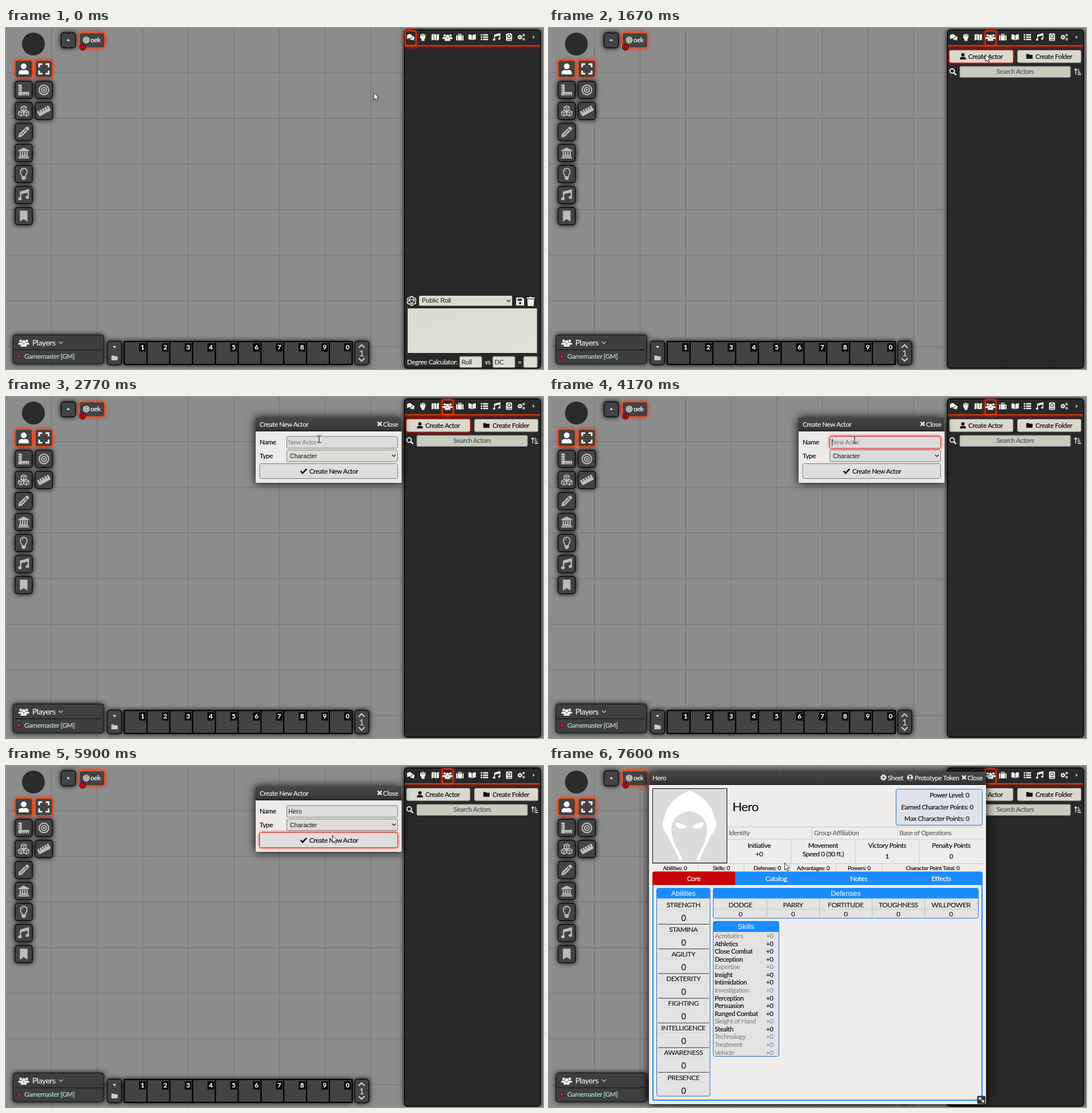
These frames come from a looping animation (940x596 px, 8 s). An HTML page:

```html
<!DOCTYPE html>
<html lang="en">
<head>
<meta charset="utf-8">
<title>Create an actor</title>
<style>
html, body { margin: 0; width: 100%; height: 100%; overflow: hidden; background: #8c8c8c; }
svg { display: block; width: 940px; height: 596px; }
text { font-family: Lato, "Open Sans", sans-serif; letter-spacing: -.03em; stroke: currentColor; stroke-width: .22px; fill: currentColor; white-space: pre; }
text.form { font-family: "Liberation Sans", Arial, sans-serif; letter-spacing: 0; stroke: none; }
.dark { filter: drop-shadow(0 0 4px #000); }
.deep { filter: drop-shadow(0 0 8px #000); }
.hot { filter: drop-shadow(0 0 3px #ff2800); }
.focus { filter: drop-shadow(0 0 2.5px #f00); }
</style>
</head>
<body>
<svg id="stage" viewBox="0 0 940 596" xmlns="http://www.w3.org/2000/svg"></svg>
<script>
const LOOP = 8000;
const BLUE = '#1a8cff';

// ---- drawing helpers ----
const rect = (x, y, w, h, fill, attr = '') =>
  `<rect x="${x}" y="${y}" width="${w}" height="${h}" fill="${fill}" ${attr}/>`;
const line = (x1, y1, x2, y2, color, w = 1) =>
  `<path d="M${x1} ${y1}L${x2} ${y2}" stroke="${color}" stroke-width="${w}"/>`;
const text = (x, y, s, color = '#111', size = 11.6, attr = '') =>
  `<text x="${x}" y="${y}" color="${color}" font-size="${size}" ${attr}>${s}</text>`;
const mid = (x, y, s, color, size, attr = '') =>
  text(x, y, s, color, size, 'text-anchor="middle" ' + attr);
const form = (x, y, s, color, attr = '') => text(x, y, s, color, 10.8, 'class="form" ' + attr);
const group = (id, body, attr = '') => `<g id="${id}" ${attr}>${body}</g>`;
const path = (d, attr = '') => `<path d="${d}" ${attr}/>`;
const dot = (x, y, r, attr = '') => `<circle cx="${x}" cy="${y}" r="${r}" ${attr}/>`;
const pen = (w = 2) => `fill="none" stroke="currentColor" stroke-width="${w}"`;
const repeat = (n, f) => Array.from({ length: n }, (_, i) => f(i)).join('');

// ---- icons, drawn in a box from -8 to 8 ----
const body = (x, y, s) => `<g transform="translate(${x} ${y}) scale(${s})">` +
  dot(0, -3.8, 4.2) + path('M-7.4 8V5.6C-7.4 2.6-5 1.6-2.6 1.4Q0 2.6 2.6 1.4C5 1.6 7.4 2.6 7.4 5.6V8Z') + '</g>';
const cog = (x, y, s) => `<g transform="translate(${x} ${y}) scale(${s})">` +
  dot(0, 0, 4.4, pen(3.6)) + dot(0, 0, 6.8, pen(2.6) + ' stroke-dasharray="2.9 2.44"') + '</g>';
const cube = (x, y) => path(`M${x} ${y - 4}l3.7 1.7v4.2l-3.7 2-3.7-2v-4.2zM${x - 3.6} ${y - 2.2}l3.6 1.7 3.6-1.7M${x} ${y - .5}v4.3`, pen(1.3));
const icons = {
  user: body(0, 0, 1),
  users: body(-5.4, -1, .55) + body(5.4, -1, .55) + body(0, 1.3, .72),
  expand: path('M-7-2.5V-7H-2.5M2.5-7H7V-2.5M7 2.5V7H2.5M-2.5 7H-7V2.5', pen(2.4)),
  corner: path('M-8-8H-3V3H8V8H-8ZM-8-4.5h2.5M-8-1h2.5M-8 2.5h2.5M-1.5 8V5.5M2 8V5.5M5.5 8V5.5') +
    path('M-8-4.8h2.6M-8-1.4h2.6M-8 2h2.6M-1.5 8V5.4M2 8V5.4M5.4 8V5.4', 'stroke="#444" stroke-width="1.1"'),
  target: dot(0, 0, 7, pen(1.8)) + dot(0, 0, 3.6, pen(1.8)) + dot(0, 0, 1.5),
  cubes: cube(0, -3.6) + cube(-4, 3.6) + cube(4, 3.6),
  ruler: '<g transform="rotate(-28)">' + rect(-9.5, -4, 19, 8, 'currentColor', 'rx="1"') +
    path('M-6-4v3.6M-2-4v3.6M2-4v3.6M6-4v3.6', 'stroke="#444" stroke-width="1.2"') + '</g>',
  pencil: path('M-8 8L-7 3 3-7Q5-8.6 7-6.8T7-3L-3 7Z') + path('M1.6-5.4L5.4-1.6M-4.5 4.5L3-3', 'stroke="#444" stroke-width="1"'),
  bank: path('M-8-4L0-8 8-4V-2.6H-8ZM-8 8V6H8V8ZM-6.6 5.4V3.6H6.6V5.4Z') + path('M-5-2V4M-1.7-2V4M1.7-2V4M5-2V4', pen(1.9)),
  bulb: path('M-2.4 4C-2.4 1.5-5-.4-5-3.4A5 5 0 0 1 5-3.4C5-.4 2.4 1.5 2.4 4Z', pen(1.6)) +
    path('M-2.8 5H2.8V7L1 8.5H-1L-2.8 7ZM-3-3.4Q-2.6-5.8 0-6', 'stroke="currentColor" stroke-width=".5"'),
  music: path('M-4.6 5V-4.4L6.8-7.4V3', pen(1.9)) + path('M-5-5L7.7-8.4V-4L-5-1Z') +
    '<ellipse cx="-5.6" cy="5.4" rx="2.6" ry="2.2"/><ellipse cx="5.4" cy="3.4" rx="2.6" ry="2.2"/>',
  mark: path('M-5.6-8H5.6V8L0 4.4-5.6 8Z'),
  chat: '<ellipse cx="-2.4" cy="-2" rx="5.8" ry="4.4"/>' + path('M-7 0L-8 4.4-2 2ZM4-2.6C9-2 9.6 3 6.8 4.4L8 7.4 3.8 5.8C.4 6.2-1.6 5-2 3.4 2 3.4 4.6 1 4-2.6Z'),
  fist: path('M-5-6h2v4h.8v-5.4h2V-2h.8v-5h2v5h.8v-4H5.4V1L3.4 4V8H-3V5L-6 1V-2Z'),
  map: path('M-8-5.4L-3.4-7V5.4L-8 7ZM-2.4-7L2.4-5.4V7L-2.4 5.4ZM3.4-5.4L8-7V5.4L3.4 7Z'),
  case: rect(-8, -4, 2.6, 11, 'currentColor') + rect(5.4, -4, 2.6, 11, 'currentColor') + rect(-4.4, -4, 8.8, 11, 'currentColor') + path('M-3-4V-6.4H3V-4', pen(1.6)),
  book: path('M-.6-4.4Q-4-6.4-8-6V5Q-4 5-.6 6.8ZM.6-4.4Q4-6.4 8-6V5Q4 5 .6 6.8Z'),
  list: path('M-8-5h3.4M-8 0h3.4M-8 5h3.4M-3-5H8M-3 0H8M-3 5H8', pen(3.2)),
  atlas: rect(-6.4, -8, 12.8, 16, 'currentColor', 'rx="2"') + dot(.4, -1.8, 3.4, 'fill="none" stroke="#333" stroke-width="1.4"') + path('M-4 5.4H5', 'stroke="#333" stroke-width="1.4"'),
  cogs: cog(-3, 0, .64) + cog(5, -4.4, .36) + cog(5, 4.4, .36),
  cog: cog(0, 0, 1),
  right: path('M-3-6L4 0-3 6Z'),
  up: path('M-6 3L0-4 6 3Z'),
  down: path('M-6-3L0 4 6-3Z'),
  chevUp: path('M-7 4L0-3 7 4', pen(3)),
  chevDown: path('M-7-4L0 3 7-4', pen(3)),
  folder: path('M-8-6H-2L0-4H8V6H-8Z'),
  die: path('M0-8L7-4V4L0 8-7 4V-4ZM0-8L-4-2H4ZM-4-2L0 5 4-2M-7-4L-4-2-7 4 0 5 7 4 4-2 7-4M0 5V8', pen(1)),
  save: path('M-7-7H4L7-4V7H-7Z') + rect(-4.6, -5, 7.6, 4, '#333') + dot(0, 3, 2.2, 'fill="#333"'),
  trash: path('M-7-7H-2.4L-1.6-8H1.6L2.4-7H7V-5H-7ZM-6-4H6L5.2 8H-5.2Z'),
  lens: dot(-1.6, -1.6, 4.8, pen(2.4)) + path('M2 2L7 7', pen(3)),
  sort: path('M-4.6 7V-6M-7.6-3L-4.6-6.4-1.6-3M0-5H3M0-1H4.6M0 3H6.2M0 7H8', pen(1.8)),
  check: path('M-7 0L-2.4 4.8 7-5', pen(3.4)),
  cross: path('M-5-5L5 5M5-5L-5 5', pen(3.6)),
  face: path('M-8 0a8 8 0 1 0 16 0a8 8 0 1 0-16 0ZM-3.2-2.4a3.2 3.2 0 1 1 6.4 0a3.2 3.2 0 1 1-6.4 0ZM-5 5Q-3.4 2.4 0 2.4T5 5Q0 9-5 5Z', 'fill-rule="evenodd"')
};
const icon = (name, x, y, size, color = '#eee') =>
  `<g transform="translate(${x} ${y}) scale(${size / 16})" color="${color}" fill="currentColor">${icons[name]}</g>`;

// ---- scene parts ----
function grid() {
  return rect(0, 0, 940, 596, '#8c8c8c') +
    repeat(12, i => line(-.2 + i * 79.8, 0, -.2 + i * 79.8, 596, '#747474')) +
    repeat(7, i => line(0, 78 + i * 79.8, 940, 78 + i * 79.8, '#747474'));
}
const tile = (x, y, w, h, hot) =>
  rect(x, y, w, h, '#434343', `rx="4" stroke="${hot ? '#ff5010' : '#0c0c0c'}" stroke-width="1.4" class="${hot ? 'hot' : 'dark'}"`);
function tools() {
  const left = ['user', 'corner', 'cubes', 'pencil', 'bank', 'bulb', 'music', 'mark'];
  const right = ['expand', 'target', 'ruler'];
  const column = (names, x) => names.map((n, i) => {
    const y = 56.5 + i * 36.75;
    return tile(x, y, 30, 30, !i) + icon(n, x + 15, y + 15, 19, i ? '#bcbcbc' : '#fff');
  }).join('');
  return dot(48, 28, 20, 'fill="#2b2b2b"') +
    tile(96.5, 8.5, 25, 26) + icon('up', 109, 21, 8) +
    tile(128.5, 8.5, 44, 26, true) + icon('target', 140.5, 21, 11.5, '#fff') + text(148, 25, 'oek', '#fff') +
    dot(134, 33.5, 5.5, 'fill="#d01222" stroke="#400"') + mid(134, 36.8, 'G', '#300', 9) +
    column(left, 16) + column(right, 51.3);
}
function players() {
  return rect(12.5, 536.5, 158.5, 50.5, '#3e3e3e', 'rx="4" stroke="#111" class="dark"') +
    icon('users', 31, 550, 16) + text(46, 554.5, 'Players', '#eee', 13.8) + icon('chevDown', 96, 550, 8, '#bbb') +
    line(16, 562.5, 168, 562.5, '#111') + dot(22.5, 574, 3.2, 'fill="#c8283c" stroke="#300"') +
    text(32, 578, 'Gamemaster [GM]', '#bcdccd');
}
function hotbar() {
  const slot = i => rect(207 + i * 39.9, 548, 39.9, 40, '#434343', 'stroke="#000" stroke-width="2"') +
    rect(233 + i * 39.9, 551, 11.5, 14.5, '#080808') +
    mid(238.8 + i * 39.9, 562.3, (i + 1) % 10, '#fff', 11.5, 'font-weight="700"');
  return tile(177.5, 547.5, 25, 41) + icon('down', 190, 557.5, 8) + icon('folder', 190, 576.5, 11, '#ccc') +
    rect(206, 547, 400, 42, '#000', 'rx="2" class="dark"') + repeat(10, slot) +
    tile(610.5, 547.5, 24.5, 41) + icon('chevUp', 622.5, 556, 12, '#ccc') + mid(622.5, 574, '1', '#ccc', 16) + icon('chevDown', 622.5, 580, 12, '#ccc');
}
const tabX = i => 708.3 + i * 21.53;
function sidebar() {
  const names = ['chat', 'fist', 'map', 'users', 'case', 'book', 'list', 'music', 'atlas', 'cogs', 'right'];
  return rect(697.5, 3.5, 238, 591, '#2c2c2c', 'fill-opacity=".9" rx="5" stroke="#000" stroke-width="1.4" class="dark"') +
    rect(698, 32, 237, 5, 'url(#under)') + line(698, 31, 935, 31, '#ff4a0c', 1.6) +
    '<ellipse id="hover" cy="16" rx="10" ry="9" fill="url(#redSpot)"/>' +
    rect(0, 5, 18.5, 25.5, '#3c2420', 'id="tabBox" rx="3" stroke="#ff4010" stroke-width="1.3" class="hot"') +
    names.map((n, i) => icon(n, tabX(i), 16, i == 10 ? 8 : i == 3 ? 15 : 13, i == 10 ? '#bbb' : '#f2f2ea')).join('');
}
function chat() {
  const box = (x, w) => rect(x, 574, w, 19.5, '#deded4', 'rx="2" stroke="#777"');
  return icon('die', 710, 477, 17) +
    rect(723, 468, 163, 17.5, '#dadad0', 'rx="2"') + form(728, 480.2, 'Public Roll', '#111') + icon('chevDown', 880, 477, 7, '#222') +
    icon('save', 900, 478, 16, '#f0f0e4') + icon('trash', 918.5, 478, 16, '#f0f0e4') +
    rect(702.5, 489.5, 227.5, 79, 'url(#paper)', 'stroke="#222"') +
    text(702, 587.5, 'Degree Calculator:', '#eee') + box(794, 39) + text(797.5, 587.5, 'Roll', '#444') +
    text(838, 587.5, 'vs', '#eee') + box(852, 39) + text(855, 587.5, 'DC', '#444') + text(896, 587.5, '=', '#eee') + box(906, 24);
}
function actors() {
  const button = (x, name, label, attr) => rect(x, 38.5, 112, 22.5, '#d8d9cc', 'rx="3" ' + attr);
  return button(700.7, '', '', 'stroke="#555"') + button(819.7, '', '', 'stroke="#555"') +
    group('makeFocus', rect(700.7, 38.5, 112, 22.5, '#d8d9cc', 'rx="3" stroke="#c22" class="focus"')) +
    icon('user', 724.5, 49.5, 11, '#111') + text(734, 53.6, 'Create Actor') +
    icon('folder', 841, 49.5, 11, '#111') + text(851.5, 53.6, 'Create Folder') +
    icon('lens', 707, 76.5, 13) + rect(719, 67, 194, 19.5, '#c9cabe', 'rx="2" stroke="#777"') +
    mid(816, 80.2, 'Search Actors', '#555') + icon('sort', 925.5, 76, 12);
}
function dialog() {
  return group('dialog', '<g class="deep">' + rect(437, 36, 255.5, 114, '#ecebe9', 'rx="2"') + '</g>' +
    rect(437, 36, 255.5, 23.5, 'url(#bar)') + line(437, 59.5, 692.5, 59.5, '#000') +
    text(444, 51.5, 'Create New Actor', '#eee') + icon('cross', 654, 47, 11) + text(660, 51.5, 'Close', '#eee') +
    text(444, 82.5, 'Name') + text(444, 106.5, 'Type') +
    rect(491.5, 69, 194, 20.5, '#dddcda', 'rx="3" stroke="#7a7971"') +
    group('nameFocus', rect(491.5, 69, 194, 20.5, '#dddcda', 'rx="3" stroke="#c44" class="focus"')) +
    form(494.5, 83, 'New Actor', '#777', 'id="hint"') + form(494.5, 83, '', '#111', 'id="typed"') +
    rect(0, 73, 1, 13, '#111', 'id="caret"') +
    rect(491.5, 92.5, 194, 20.5, '#dddcda', 'rx="3" stroke="#7a7971"') + form(497, 106.5, 'Character', '#111') +
    icon('chevDown', 679, 102.5, 7.5, '#222') +
    rect(444, 116.5, 241.5, 26, '#dfdedc', 'rx="3" stroke="#777"') +
    group('sendFocus', rect(444, 116.5, 241.5, 26, '#dfdedc', 'rx="3" stroke="#c44" class="focus"')) +
    icon('check', 521, 129.5, 12, '#111') + text(531, 133.5, 'Create New Actor'));
}
function portrait() {
  return rect(181.5, 39.5, 130, 130, '#dbdbdb', 'stroke="#000"') +
    path('M246 43C226 50 206 68 202 90C196 104 199 112 207 120C213 137 223 147 228 165H234C230 150 217 139 215 118C211 98 224 81 246 79C268 81 279 98 276 118C274 139 262 150 258 165H264C269 147 278 137 284 120C292 112 296 104 290 90C286 68 266 50 246 43Z', 'fill="#fff"') +
    path('M221 99Q232 99 242 106Q237 110 230 109.500T221 99ZM271 99Q260 99 250 106Q255 110 262 109.500T271 99Z', 'fill="#fff"');
}
function summary() {
  const soft = '#c4c8d0';
  const totals = [[220.500, 'Abilities'], [301.500, 'Skills'], [382, 'Defenses'], [462.500, 'Advantages'], [543, 'Powers'], [671.500, 'Character Point Total']];
  const stats = [['Initiative', '+0', 158], ['Movement', 'Speed 0 (30 ft.)', 158], ['Victory Points', '1', 162], ['Penalty Points', '0', 162]];
  return text(321, 79, 'Hero', '#111', 22) +
    rect(607.5, 40.5, 151, 63, '#dfe2e8', 'rx="3" stroke="#2a6db4"') +
    text(666.5, 54.5, 'Power Level: 0') + text(616.5, 75.5, 'Earned Character Points: 0') + text(622, 96, 'Max Character Points: 0', '#222') +
    line(312, 106.5, 759, 106.5, soft) + line(312, 128, 759, 128, soft) + line(181, 170.5, 759, 170.5, soft) +
    line(460.5, 106, 460.5, 128, soft) + line(610.5, 106, 610.5, 128, soft) +
    text(315, 121, 'Identity', '#666') + text(464, 121, 'Group Affiliation', '#666') + text(613.5, 121, 'Base of Operations', '#666') +
    stats.map(([name, value, y], i) => mid(368 + i * 112, 142.5, name) + mid(368 + i * 112, y, value) +
      (i ? line(311.5 + i * 112.2, 128, 311.5 + i * 112.2, 170, soft) : '')).join('') +
    totals.map(([x, name], i) => mid(x, 181.5, name + ': 0', '#111', 9.9) +
      (i ? line(180.5 + i * 80.5, 171, 180.5 + i * 80.5, 184, soft) : '')).join('');
}
function core() {
  const title = (x, y, w, h, s) => path(`M${x} ${y + h}v${4 - h}q0-4 4-4h${w - 8}q4 0 4 4v${h - 4}z`, `fill="${BLUE}"`) +
    mid(x + w / 2, y + 13.8, s, '#fff', 12.4, 'class="form"');
  const frame = (x, y, w, h) => rect(x, y, w, h, '#e3e3e3', 'rx="3" stroke="#2f70b5"');
  const abilities = 'STRENGTH STAMINA AGILITY DEXTERITY FIGHTING INTELLIGENCE AWARENESS PRESENCE'.split(' ');
  const defenses = 'DODGE PARRY FORTITUDE TOUGHNESS WILLPOWER'.split(' ');
  const skills = '-Acrobatics,Athletics,Close Combat,Deception,-Expertise,Insight,Intimidation,-Investigation,Perception,Persuasion,Ranged Combat,-Sleight of Hand,Stealth,-Technology,-Treatment,-Vehicle'.split(',');
  return frame(188.5, 213.5, 93.5, 363.5) + title(188.5, 213, 93.5, 18.5, 'Abilities') +
    abilities.map((name, i) => {
      const y = i * 43.15;
      return mid(235.3, 246.5 + y, name, '#222', 12) + line(191, 250.5 + y, 280, 250.5 + y, '#d2d5da') +
        mid(235.5, 270.5 + y, '0', '#222', 14.5) + (i < 7 ? line(191, 276.5 + y, 280, 276.5 + y, '#333a44') : '');
    }).join('') +
    frame(287.5, 213.5, 464, 52.5) + title(287.5, 213, 464, 18.5, 'Defenses') +
    defenses.map((name, i) => mid(335.2 + i * 92.1, 246.5, name, '#222', 12) + mid(335.2 + i * 92.1, 262.5, '0', '#222') +
      (i ? line(289.3 + i * 92.1, 232, 289.3 + i * 92.1, 266, '#b4bac4') : '')).join('') +
    line(288, 250.5, 751, 250.5, '#c4c9d0') +
    frame(287.5, 271.5, 115, 236) + title(287.5, 271, 115, 19, 'Skills') +
    skills.map((s, i) => {
      const color = s[0] == '-' ? '#8c8c8c' : '#151515', y = 301 + i * 13.57;
      return text(290, y, s.replace('-', ''), color, 11.5) + text(380, y, '+0', color, 11.5);
    }).join('') + group('gear', icon('cog', 554, 222.3, 11.5, '#fff'));
}
function sheet() {
  const tabs = ['Core', 'Catalog', 'Notes', 'Effects'];
  return group('sheet', '<g class="deep">' + rect(175, 10, 590, 581, '#eeedeb', 'rx="3"') + '</g>' +
    rect(175, 10, 590, 22.5, 'url(#bar)', 'rx="3"') + line(175, 32.5, 765, 32.5, '#000') +
    text(181, 24.5, 'Hero', '#eee') + icon('cog', 585.5, 20, 11) + text(593, 24.5, 'Sheet', '#eee') +
    icon('face', 632, 20, 10.5) + text(640, 24.5, 'Prototype Token', '#eee') + icon('cross', 726.5, 20, 11) + text(732.5, 24.5, 'Close', '#eee') +
    portrait() + summary() +
    rect(182, 200, 576, 384, 'none', `stroke="${BLUE}" stroke-width="2"`) +
    rect(181, 184.5, 578, 23.5, BLUE, 'rx="4"') + rect(181, 184.5, 145, 23.5, '#c80404', 'rx="4"') +
    rect(181, 200, 145, 8, '#c80404') + rect(326, 200, 433, 8, BLUE) +
    tabs.map((s, i) => mid(253.2 + i * 144.5, 200.5, s, '#fff', 12.2)).join('') + core() +
    rect(749.5, 576.5, 14.5, 14, '#333', 'rx="2"') +
    path('M753 580L761 587M753 583.500V580H756.500M757.500 587H761V583.500', 'fill="none" stroke="#fff" stroke-width="1.4"'));
}
function cursors() {
  const edge = 'fill="#fff" stroke="#111" stroke-width=".9" stroke-linejoin="round"';
  return group('arrow', path('M0 0V12.200L2.900 9.600 4.900 14.200 7 13.300 5 8.800H8.600Z', edge)) +
    group('hand', path('M-1.600 1Q0-.8 1.400 1V5L6 6Q7.200 6.600 6.900 8.500L5.800 13.500H-1L-4 9Q-4.600 7.300-3 7.400L-1.600 8.600Z', edge)) +
    group('beam', path('M-3-6.500Q0-6.500 0-5Q0-6.500 3-6.500M0-5V4.800M-3 5.800Q0 5.800 0 4.300Q0 5.800 3 5.800', 'fill="none" stroke="#eee" stroke-width="2.600"') +
      path('M-3.500-6.500Q0-6.500 0-5Q0-6.500 3.500-6.500M0-5V4.800M-3.500 5.800Q0 5.800 0 4.300Q0 5.800 3.500 5.800', 'fill="none" stroke="#222" stroke-width="1.200"'));
}
const fade = (id, kind, a, b, attr = '') =>
  `<${kind} id="${id}" ${attr}><stop stop-color="${a}"/><stop offset="1" stop-color="${b}"/></${kind}>`;
const defs = '<defs>' +
  fade('bar', 'linearGradient', '#484848', '#333', 'x2="0" y2="1"') +
  fade('under', 'linearGradient', '#8a1c10', '#8a1c1000', 'x2="0" y2="1"') +
  fade('redSpot', 'radialGradient', '#d02010c0', '#d0201000') +
  fade('paper', 'linearGradient', '#dadad0', '#e2e2d8', 'y2="1"') + '</defs>';

const stage = document.getElementById('stage');
stage.innerHTML = defs + grid() + tools() + players() + hotbar() + sidebar() +
  group('chat', chat()) + group('actors', actors()) + dialog() + sheet() + cursors();

// ---- motion ----
const el = id => document.getElementById(id);
const show = (id, on) => el(id).setAttribute('display', on ? 'inline' : 'none');
const within = (t, a, b) => t >= a && t < b;
const clamp = v => Math.max(0, Math.min(1, v));

// start, end, from, to
const moves = [
  [230, 870, [644, 113.5], [770.5, 24.5]],
  [1520, 1770, [770.5, 24.5], [760.5, 57.5]],
  [2190, 2870, [760.5, 57.5], [535, 75]],
  [5450, 5900, [535, 75], [571.5, 121.5]],
  [6600, 6830, [542, 215], [549, 288]],
  [6980, 7600, [549, 288], [412.5, 169.5]]
];
function pointer(t) {
  let at = moves[0][2];
  for (const [a, b, from, to] of moves) {
    if (t < a || (a == 6600 && t < 6630)) break;
    const p = clamp((t - a) / (b - a)), k = p * p * (3 - 2 * p);
    at = from.map((v, i) => v + (to[i] - v) * k);
  }
  return at;
}
const keys = [4270, 4470, 4530, 4600];

function draw(t) {
  const [x, y] = pointer(t);
  const open = within(t, 2100, 6630);
  const onTabs = x > 698 && within(y, 5, 31);
  const onName = open && within(x, 491, 686) && within(y, 69, 90);
  const kind = onTabs ? 'hand' : onName ? 'beam' : 'arrow';
  for (const id of ['arrow', 'hand', 'beam']) show(id, id == kind);
  el(kind).setAttribute('transform', `translate(${x} ${y})`);

  const listed = t >= 1500;
  show('chat', !listed);
  show('actors', listed);
  el('tabBox').setAttribute('x', tabX(listed ? 3 : 0) - 9.2);
  show('hover', onTabs && !listed);
  el('hover').setAttribute('cx', tabX(Math.round((x - tabX(0)) / 21.53)));
  show('makeFocus', within(t, 1650, 2930));

  show('dialog', open);
  el('dialog').setAttribute('opacity', clamp((t - 2075) / 190));
  const word = 'Hero'.slice(0, keys.filter(k => t >= k).length);
  if (el('typed').textContent != word) el('typed').textContent = word;
  show('hint', !word);
  show('nameFocus', within(t, 2930, 5870));
  show('sendFocus', open && t > 5470 && y > 116);
  show('caret', within(t, 2930, 3530) || within(t, 4170, 5200));
  const width = open && word ? el('typed').getComputedTextLength() : 0;
  el('caret').setAttribute('x', Math.round(494.6 + width));

  show('sheet', t >= 6630);
  show('gear', within(x, 288, 751) && within(y, 213, 232));
}
const begin = performance.now();
function tick() {
  draw((performance.now() - begin) % LOOP);
  requestAnimationFrame(tick);
}
tick();
</script>
</body>
</html>
```
